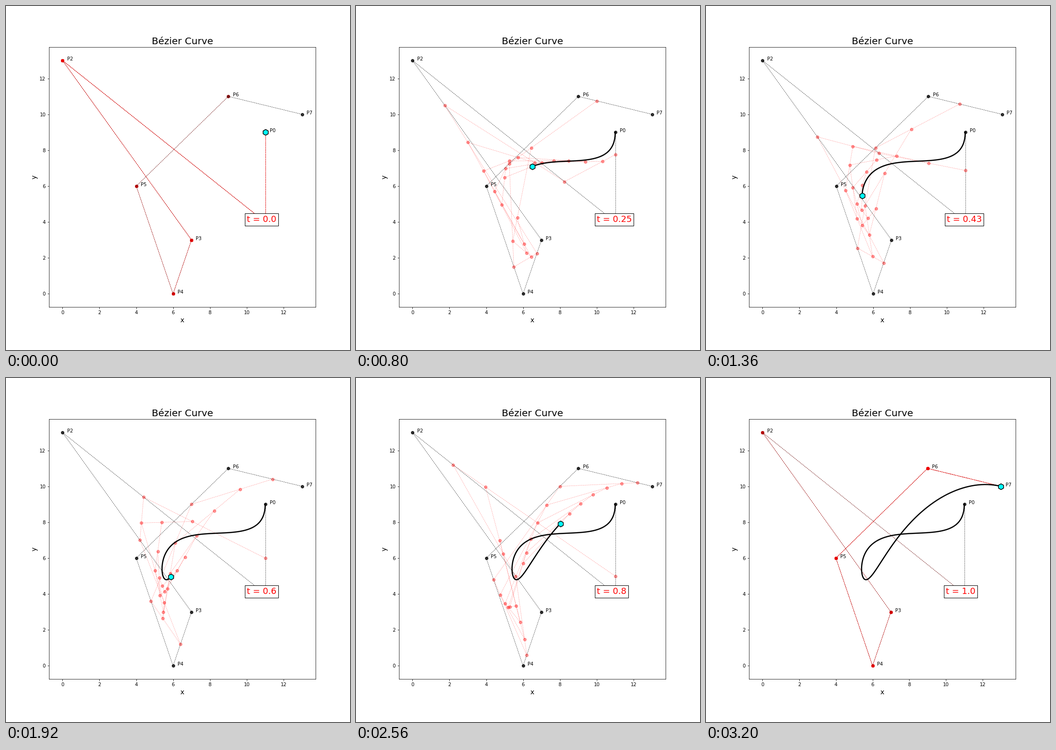
A matplotlib script that plays this animation: 720 px wide and 720 px high, repeating every 3280 ms.

```python
import numpy as np
import matplotlib.pyplot as plt
from matplotlib.animation import FuncAnimation

STEPS = 40
POINTS = np.array([(11, 9), (11, 4), (0, 13), (7, 3),
                   (6, 0), (4, 6), (9, 11), (13, 10)], float)
DOT_PAD = 3      # dot radius in px
HEX_PAD = 5.3    # half width of the moving hexagon in px
MARGIN = 0.05


def levels(t):
    """De Casteljau: point rows from the control polygon down to the curve point."""
    rows = [POINTS]
    while len(rows[-1]) > 1:
        p = rows[-1]
        rows.append((1 - t) * p[:-1] + t * p[1:])
    return rows


def segments(row):
    return list(zip(row[:-1], row[1:]))


def with_margin(lo, hi):
    m = MARGIN * (hi - lo)
    return lo - m, hi + m


plt.rcParams["font.family"] = "DejaVu Sans"
fig, ax = plt.subplots(figsize=(10, 10), dpi=72)
fig.subplots_adjust(left=0.125, right=0.9, bottom=0.125, top=0.88)
ax.set_title("Bézier Curve", fontsize=20)
ax.set_xlabel("x", fontsize=14)
ax.set_ylabel("y", fontsize=14)
ax.set_xticks(range(0, 13, 2))
ax.set_yticks(range(0, 13, 2))

# Limits leave room for the marker sizes
width, height = 558, 543.6
px = 13 * 1.1 / width
py = 13 * 1.1 / height
x_lo, x_hi = -DOT_PAD * px, 13 + DOT_PAD * px
hex_px = (x_hi - x_lo) * 1.1 / width
ax.set_ylim(with_margin(-DOT_PAD * py, 13 + DOT_PAD * py))

# Fixed control polygon
for a, b in segments(POINTS):
    ax.plot(*zip(a, b), "k--", lw=0.7, alpha=0.8)
ax.scatter(*POINTS.T, s=36, c="black", alpha=0.8, zorder=1)
for i, p in enumerate(POINTS):
    ax.annotate(f"P{i}", p, xytext=(9.2, 0), textcoords="offset points",
                fontsize=10)

# Moving parts
n_seg = sum(range(1, len(POINTS) - 1))
links = [ax.plot([], [], "r--", lw=0.7, alpha=0.4)[0] for _ in range(n_seg)]
dots = ax.scatter([], [], s=36, c="red", alpha=0.4, zorder=1)
curve, = ax.plot([], [], "k-", lw=2.5)
tip = ax.scatter([], [], s=150, c="cyan", edgecolors="black", marker="h",
                 linewidths=1.5, zorder=2.5)
label = ax.text(10, 4, "", fontsize=18, color="red", zorder=4,
                bbox=dict(facecolor="white", edgecolor="black"))


def update(i):
    t = i * 0.025
    rows = levels(t)
    inner, end = rows[1:-1], rows[-1][0]

    ends = [s for row in inner for s in segments(row)]
    for link, (a, b) in zip(links, ends):
        link.set_data([a[0], b[0]], [a[1], b[1]])
    dots.set_offsets(np.vstack(inner))

    path = [levels(u)[-1][0] for u in np.linspace(0, t, 4 * i + 1)]
    curve.set_data(*np.array(path).T)
    tip.set_offsets([end])
    label.set_text(f"t = {round(t, 2)}")
    ax.set_xlim(with_margin(x_lo, max(x_hi, end[0] + HEX_PAD * hex_px)))
    return [*links, dots, curve, tip, label]


anim = FuncAnimation(fig, update, frames=STEPS + 1, interval=80,
                     repeat=True, repeat_delay=0, blit=False)
plt.show()
```
